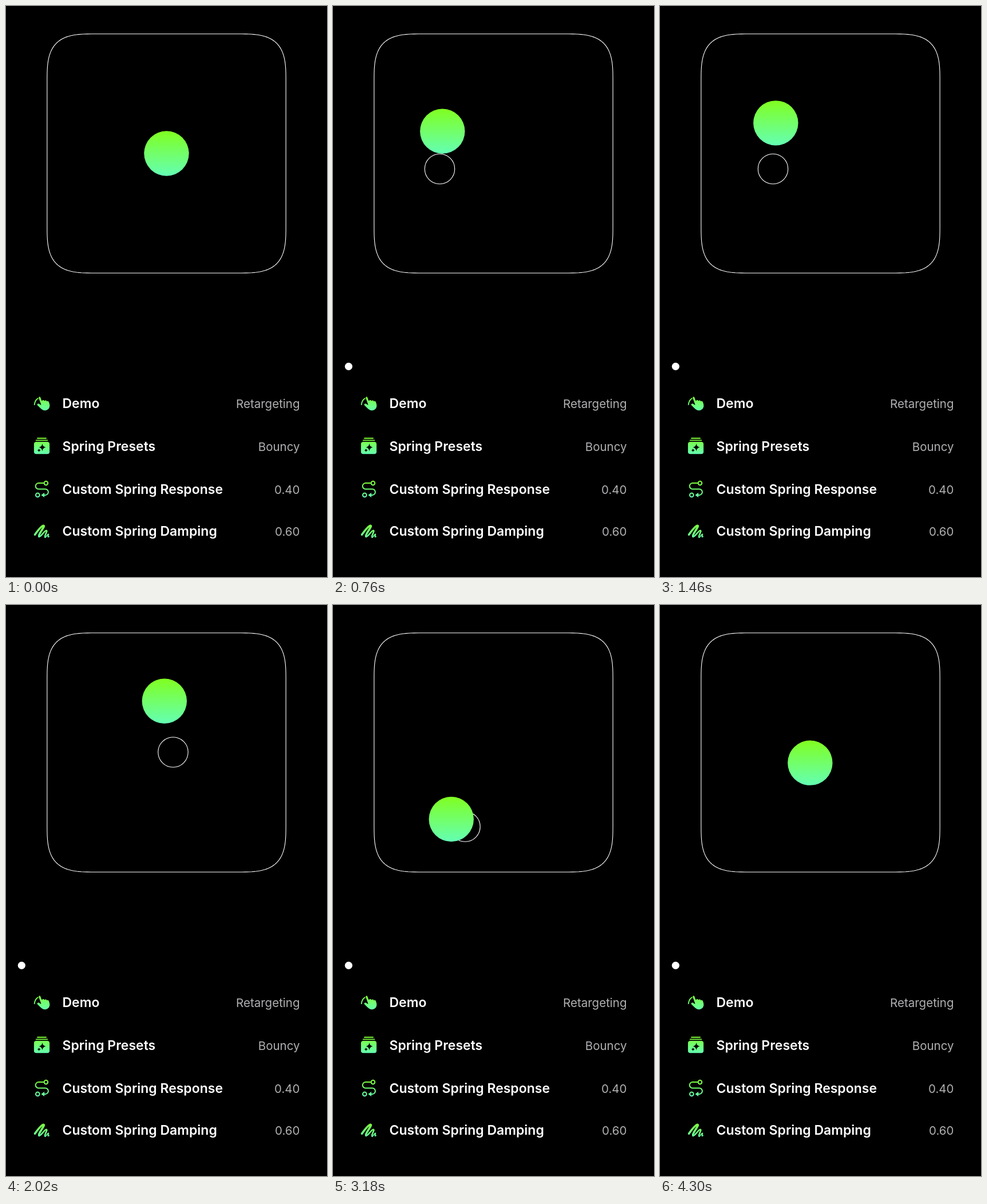
Recreate the animation shown at these times as an HTML page. Size 561 px wide and 997 px high, loop 4.37 s.

```html
<!DOCTYPE html>
<html lang="en">
<head>
<meta charset="utf-8">
<title>Spring retargeting</title>
<style>
  html, body { margin: 0; width: 100%; height: 100%; overflow: hidden; background: #000; }
  svg { display: block; width: 561px; height: 997px; }
  text { font-family: Inter, Roboto, sans-serif; }
  .label { font-size: 23px; font-weight: 600; fill: #fff; }
  .value { font-size: 20.5px; fill: #b0b0b3; text-anchor: end; }
  .line { fill: none; stroke: #fff; stroke-width: 1.1; }
  .stroke { fill: none; stroke: url(#tint); stroke-linecap: round; stroke-linejoin: round; }
  .solid { fill: url(#tint); }
</style>
</head>
<body>
<svg viewBox="0 0 561 997">
  <defs>
    <linearGradient id="fill" x1="0" y1="0" x2="0" y2="1">
      <stop offset="0" stop-color="#80ff20"/>
      <stop offset="1" stop-color="#64ffb4"/>
    </linearGradient>
    <linearGradient id="tint" gradientUnits="userSpaceOnUse" x1="0" y1="-14" x2="0" y2="14">
      <stop offset="0" stop-color="#80ff30"/>
      <stop offset="1" stop-color="#64ffb0"/>
    </linearGradient>
  </defs>

  <path id="panel" class="line"/>
  <circle id="ring" class="line" r="26.2"/>
  <circle id="ball" r="39.2" fill="url(#fill)"/>
  <circle id="dot" cx="27.3" cy="629.3" r="6.6" fill="#fff"/>

  <!-- swiping hand -->
  <g transform="translate(62.5 694)">
    <path class="stroke" stroke-width="1.9" d="M-12.8 2Q-12-5.5-6.8-8.8"/>
    <path class="stroke" stroke-width="3.2" d="M-3.8-10L.6 2"/>
    <path class="solid" d="M-1.5-4L1.4-5.6Q3.6-7 5-4.2Q7.2-7 9-3.6Q11.4-5.4 12.4-2.2C14.2 2 14.8 6.5 11.5 9.8C8 13.2 2.5 12.8-1 9.6L-7.2 3.6Q-8.9 1.6-7 .4Q-5.8-.2-4.4.8L-1 3Z"/>
  </g>

  <!-- stacked cards with sparkles -->
  <g transform="translate(62.5 768)">
    <path class="stroke" stroke-width="1.9" d="M-7.5-13.2H7.5M-9.8-9.6H9.8"/>
    <rect class="solid" x="-13.6" y="-6.9" width="27.2" height="21.2" rx="4"/>
    <path d="M1-4Q1.8 1.6 7 2.6Q1.8 3.6 1 9.2Q.2 3.6-5 2.6Q.2 1.6 1-4Z"/>
    <path d="M-4.8 4.4Q-4.4 7.3-1.4 7.8Q-4.4 8.3-4.8 11.2Q-5.2 8.3-8.2 7.8Q-5.2 7.3-4.8 4.4Z"/>
  </g>

  <!-- winding route -->
  <g transform="translate(62.5 843.5)">
    <g class="stroke" stroke-width="2">
      <circle cx="7.4" cy="-10.4" r="3.3"/>
      <circle cx="-7.2" cy="10.4" r="3.3"/>
      <path d="M3.2-10.4H-5.6A5.2 5.2 0 0 0-5.6 0H6.2A5.2 5.2 0 0 1 6.2 10.4H3"/>
    </g>
    <path class="solid" d="M-1.2 10.4L4.6 6.2V14.6Z"/>
  </g>

  <!-- scribble -->
  <g class="stroke" transform="translate(62.5 917)">
    <path stroke-width="3.6" d="M-12 6C-7-1-1-9.4 3-9.8C7.4-9.4-7 5.4-4.8 9.2"/>
    <path stroke-width="2.6" d="M-4.8 9.2C-2.2 11.2 4.4-1 8-1.2C11.2-.8 3.4 9 6 10.6"/>
    <path stroke-width="1.8" d="M6 10.6C7.6 11 10.2 4.4 11.8 5.2C12.8 6.4 8.6 11.6 12.6 9.4"/>
  </g>

  <g id="rows"></g>
</svg>

<script>
const LOOP = 4370, STEP = 20;
const RESPONSE = 0.4, DAMPING = 0.6;
const CENTER = { x: 280.5, y: 257.5 };

const byId = id => document.getElementById(id);
const ring = byId("ring"), ball = byId("ball"), dot = byId("dot");

// Offset and velocity of a damped spring after t seconds.
function spring(offset, speed, t) {
  const w = 2 * Math.PI / RESPONSE;
  const decay = DAMPING * w;
  const wd = w * Math.sqrt(1 - DAMPING * DAMPING);
  const b = (speed + decay * offset) / wd;
  const c = Math.cos(wd * t), s = Math.sin(wd * t), e = Math.exp(-decay * t);
  const pos = e * (offset * c + b * s);
  return [pos, e * wd * (b * c - offset * s) - decay * pos];
}

function axisAt(tap, axis, t) {
  const [offset, speed] = spring(tap[axis].pos - tap.goal[axis], tap[axis].speed, (t - tap.time) / 1000);
  return { pos: tap.goal[axis] + offset, speed };
}

// Each tap sets a new goal and takes over the ball's place and velocity.
const taps = [{ time: 0, goal: CENTER, x: { pos: CENTER.x, speed: 0 }, y: { pos: CENTER.y, speed: 0 } }];
function tap(time, x, y) {
  const last = taps[taps.length - 1];
  taps.push({ time, goal: { x, y }, x: axisAt(last, "x", time), y: axisAt(last, "y", time) });
}

// Two like rounds: upper right, upper left, lower left.
const FIRST_TAP = 85, ROUND = 717, PAUSE = 300;
for (let n = 0; n < 2; n++) {
  const start = FIRST_TAP + n * ROUND, drift = n * 11;
  tap(start, 372 + drift, 125);
  tap(start + PAUSE, 201 + drift, 171);
  tap(start + 2 * PAUSE, 186.5 + drift, 284.5);
}

// A quick sweep from the lower left to the right.
tap(1540, 107, 346);
tap(1700, 190, 250);
tap(1900, 301, 132);
tap(1990, 292, 257);
tap(2594, 372, 159.5);

// Back around the bottom, then to rest.
tap(2880, 170, 250);
tap(3040, 231, 387);
tap(3234, 194.5, 141);
tap(3683, 262.5, 276);

function place(circle, x, y) {
  circle.setAttribute("cx", x.toFixed(2));
  circle.setAttribute("cy", y.toFixed(2));
}

function draw(t) {
  const now = taps.filter(p => p.time <= t).pop();
  place(ball, axisAt(now, "x", t).pos, axisAt(now, "y", t).pos);
  place(ring, now.goal.x, now.goal.y);
  dot.style.display = t >= FIRST_TAP ? "" : "none";
}

// Square whose corners are quarters of a superellipse.
function squircle({ x, y }, half, extent, power) {
  const points = [], flat = half - extent, count = 160;
  const bend = v => Math.sign(v) * (flat + extent * Math.abs(v) ** (2 / power));
  for (let i = 0; i < count; i++) {
    const a = 2 * Math.PI * (i + 0.5) / count;
    points.push((x + bend(Math.cos(a))).toFixed(2) + " " + (y + bend(Math.sin(a))).toFixed(2));
  }
  return "M" + points.join("L") + "Z";
}

function row(label, value, y) {
  return `<text class="label" x="98.5" y="${y}">${label}</text>` +
    `<text class="value" x="513.5" y="${y - 0.5}">${value}</text>`;
}

byId("panel").setAttribute("d", squircle(CENTER, 208.7, 85, 3.27));
byId("rows").innerHTML =
  row("Demo", "Retargeting", 702) +
  row("Spring Presets", "Bouncy", 777) +
  row("Custom Spring Response", RESPONSE.toFixed(2), 852) +
  row("Custom Spring Damping", DAMPING.toFixed(2), 925);

const began = performance.now();
function tick() {
  const t = (performance.now() - began) % LOOP;
  draw(Math.floor(t / STEP) * STEP);
  requestAnimationFrame(tick);
}
draw(0);
tick();
</script>
</body>
</html>
```
